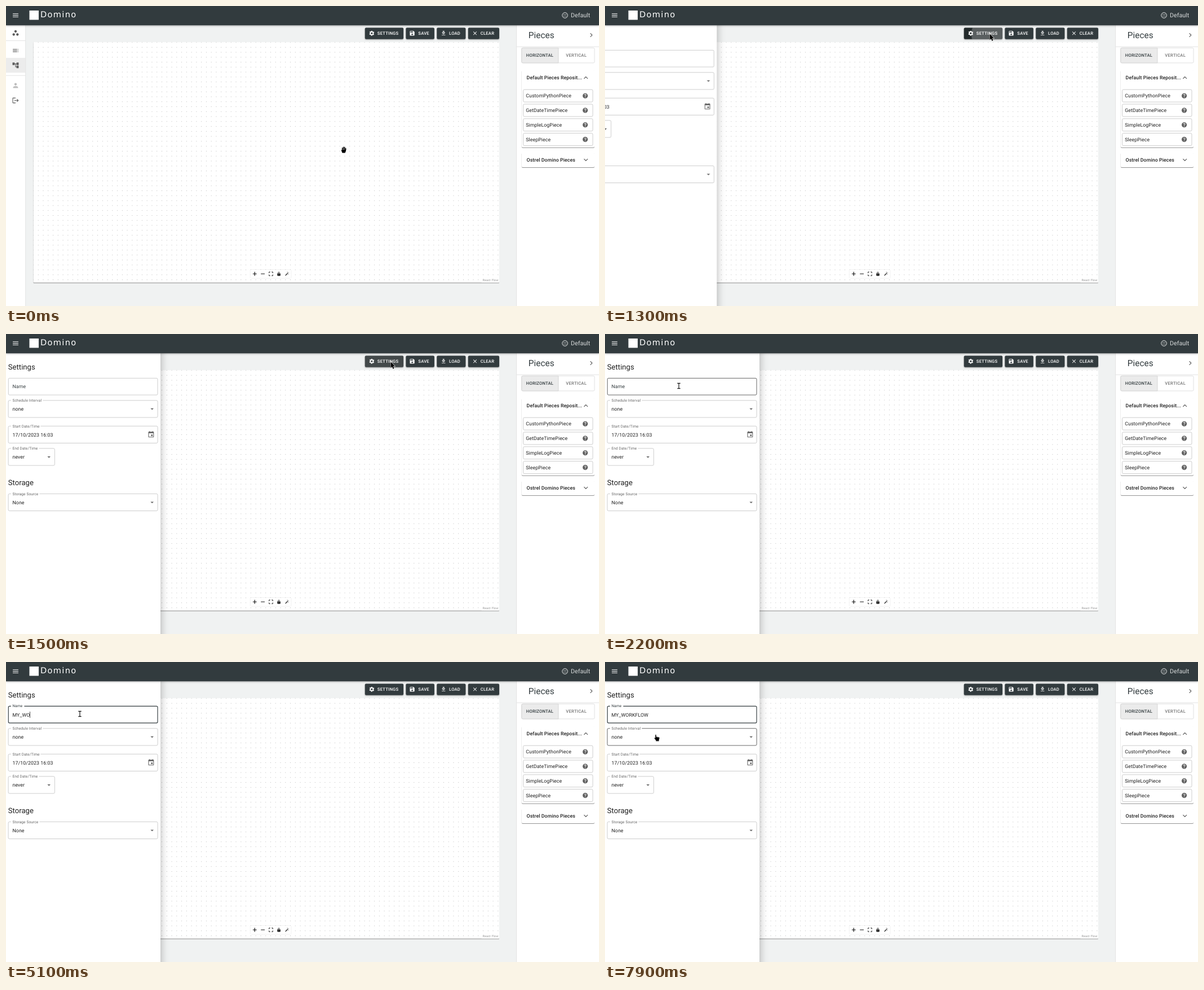
These frames come from a looping animation (1052x532 px, 8 s). An HTML page:

```html
<!DOCTYPE html>
<html lang="en">
<head>
<meta charset="utf-8">
<title>Workflow editor</title>
<style>
html, body { margin: 0; width: 100%; height: 100%; overflow: hidden; background: #f0f2f2; }
svg { display: block; }
#stage { width: 1052px; height: 532px; font: 8.77px Roboto, sans-serif; letter-spacing: .00938em; text-rendering: geometricPrecision; }
text { fill: #212121; white-space: pre; }
.dark { fill: #323b3e; }
.white, .btn text { fill: #fff; }
.h { font-size: 13.15px; letter-spacing: 0; }
.caps { font-size: 7.67px; font-weight: 500; letter-spacing: .02857em; }
.bold { font-weight: 500; }
.mid { text-anchor: middle; }
.line { stroke: #dcdcdc; stroke-width: .8; }
.chev { fill: none; stroke: #555; stroke-width: 1.1; }
.card { fill: #fff; filter: drop-shadow(0 1px .45px rgba(0,0,0,.42)); }
.item { fill: #fff; stroke: #bdbdbd; stroke-width: .75; }
.box { fill: #fff; stroke: #bcbcbc; stroke-width: .75; }
.notch { fill: #fff; }
.label { font-size: 6.58px; fill: #666; }
.btn rect { fill: #323b3e; filter: drop-shadow(0 1px 1px rgba(0,0,0,.35)); }

/* every animation is scrubbed by --t */
.anim, #cursor g { animation: 8s linear calc(var(--t) * -1ms) infinite paused; }
#cursor { animation-name: move; }
#cursor g { animation-timing-function: step-end; }
#cursor #grab { animation-name: grab; }
#cursor #point { animation-name: point; }
#cursor #arrow { animation-name: arrow; }
#cursor #beam { animation-name: beam; }
#drawer { animation-name: slide; filter: drop-shadow(0 6px 7.5px rgba(0,0,0,.3)); }
#ripple { animation-name: ripple; }
#rippleFade { animation-name: fade; }
.btn #hot { animation-name: hover; }
#nameBox { animation-name: focus; animation-timing-function: step-end; }
#nameNotch { animation-name: open; animation-timing-function: step-end; }
#schedBox { animation-name: over; animation-timing-function: step-end; }
#nameLabel { animation-name: shrink; }

@keyframes move {
  0%, 1.25% { transform: translate(599px,255px); animation-timing-function: ease-in-out; }
  10%, 20% { transform: translate(684px,56px); animation-timing-function: ease-in; }
  23.75% { transform: translate(353px,92px); }
  25% { transform: translate(235px,93px); animation-timing-function: ease-out; }
  27.5% { transform: translate(131px,92px); animation-timing-function: step-end; }
  96.25% { transform: translate(97px,133px); animation-timing-function: step-end; }
  98.75%, 100% { transform: translate(92px,134.5px); }
}
@keyframes grab { 0% { opacity: 1; } 10% { opacity: 0; } 22.5% { opacity: 1; } 25%, 100% { opacity: 0; } }
@keyframes point { 0% { opacity: 0; } 10% { opacity: 1; } 15% { opacity: 0; } 96.25%, 100% { opacity: 1; } }
@keyframes arrow { 0% { opacity: 0; } 15% { opacity: 1; } 22.5%, 100% { opacity: 0; } }
@keyframes beam { 0% { opacity: 0; } 25% { opacity: 1; } 96.25%, 100% { opacity: 0; } }
@keyframes slide {
  0%, 15.2% { transform: translateX(-310px); }
  15.225% { transform: translateX(-274px); animation-timing-function: cubic-bezier(0,0,.2,1); }
  18.04%, 100% { transform: none; }
}
@keyframes ripple {
  0%, 13.2% { transform: scale(0); animation-timing-function: cubic-bezier(.4,0,.2,1); }
  20.075%, 100% { transform: scale(1); }
}
@keyframes fade {
  0%, 13.2% { opacity: .1; }
  14.5%, 15.6% { opacity: .28; }
  22.5%, 100% { opacity: 0; }
}
@keyframes hover { 0%, 9.5% { fill: #323b3e; } 12.5%, 21.25% { fill: #232a2b; } 24%, 100% { fill: #323b3e; } }
@keyframes focus {
  0% { stroke: #bcbcbc; stroke-width: .75px; }
  25% { stroke: #333; stroke-width: .75px; }
  28.75%, 100% { stroke: #323b3e; stroke-width: 1.15px; }
}
@keyframes open { 0% { opacity: 0; } 28.75%, 100% { opacity: 1; } }
@keyframes over { 0% { stroke: #bcbcbc; } 96.25%, 100% { stroke: #333; } }
@keyframes shrink {
  0%, 28% { transform: translate(11.5px,96.3px); animation-timing-function: cubic-bezier(0,0,.2,1); }
  30.5%, 100% { transform: translate(11.5px,80.3px) scale(.75); fill: #323b3e; }
}
</style>
</head>
<body>
<svg id="stage" viewBox="0 0 1052 532">
  <defs>
    <pattern id="dots" x="44.1" y="60.1" width="8.77" height="8.77" patternUnits="userSpaceOnUse">
      <circle cx="4.385" cy="4.385" r=".55" fill="#aaa"/>
    </pattern>
    <clipPath id="hotClip"><rect x="636.8" y="38.5" width="68.3" height="20.2" rx="2"/></clipPath>
    <g id="help" transform="scale(.457) translate(-12 -12)"><path fill="#616161" d="M12 2C6.48 2 2 6.48 2 12s4.48 10 10 10 10-4.48 10-10S17.52 2 12 2zm1 17h-2v-2h2v2zm2.07-7.75l-.9.92C13.45 12.9 13 13.5 13 15h-2v-.5c0-1.1.45-2.1 1.17-2.83l1.24-1.26c.37-.36.59-.86.59-1.41 0-1.1-.9-2-2-2s-2 .9-2 2H8c0-2.21 1.79-4 4-4s4 1.79 4 4c0 .88-.36 1.68-.93 2.25z"/></g>
    <path id="drop" d="M-2.8-1.2h5.6L0 1.6z" fill="#666"/>
  </defs>

  <rect width="1052" height="532" fill="#f0f2f2"/>

  <!-- flow canvas -->
  <rect class="card" x="48.5" y="64.3" width="826.5" height="426.2" rx="1"/>
  <rect x="48.5" y="64.3" width="826.5" height="426.2" fill="url(#dots)"/>
  <rect x="843.5" y="481.5" width="31.5" height="9" fill="#fff" opacity=".6"/>
  <text x="845.5" y="487.6" style="font-size:5.5px;fill:#999;letter-spacing:.02em">React Flow</text>
  <rect x="434" y="468" width="71.5" height="14.3" fill="#fff" style="filter:drop-shadow(0 0 1px rgba(0,0,0,.12))"/>
  <g fill="none" stroke="#111" stroke-width="1.2">
    <path d="M437.9 475h6.8M441.3 471.6v6.8M452.2 475h6.8"/>
    <path d="M466.7 473.8v-2.1h2.1M471.2 471.7h2.1v2.1M473.3 476.2v2.1h-2.1M468.8 478.3h-2.1v-2.1" stroke-width=".9"/>
    <path d="M482.6 474.5v-1a1.5 1.5 0 0 1 3 0" stroke-width=".9"/>
    <path d="M495.7 477.9l4-4" stroke-width="1.3"/>
    <path d="M499.2 471.6v1.3M501.6 475.2h-1.3M500.2 473.4l1.2-1.2" stroke-width=".7"/>
  </g>
  <rect x="481.4" y="474.2" width="5.4" height="4.2" rx=".6" fill="#111"/>
  <circle cx="484.1" cy="476.3" r=".6" fill="#fff"/>

  <!-- toolbar -->
  <g class="btn caps">
    <rect id="hot" class="anim" x="636.8" y="38.5" width="68.3" height="20.2" rx="2"/>
    <rect x="709.4" y="38.5" width="50.5" height="20.2" rx="2"/>
    <rect x="764.3" y="38.5" width="51.1" height="20.2" rx="2"/>
    <rect x="819.8" y="38.5" width="55.2" height="20.2" rx="2"/>
    <g clip-path="url(#hotClip)"><g transform="translate(684 50)"><g id="rippleFade" class="anim"><circle id="ripple" class="anim" r="49" fill="#fff"/></g></g></g>
    <g transform="translate(648.9 48.4) scale(.457)" fill="none" stroke="#fff">
      <circle r="5.4" stroke-width="3.6"/>
      <circle r="8.1" stroke-width="3.2" stroke-dasharray="4.4 4.082" transform="rotate(-105.5)"/>
    </g>
    <g class="white">
      <path transform="translate(720.6 48.4) scale(.457) translate(-12 -12)" d="M17 3H5c-1.11 0-2 .9-2 2v14c0 1.1.89 2 2 2h14c1.1 0 2-.9 2-2V7l-4-4zm-5 16c-1.66 0-3-1.34-3-3s1.34-3 3-3 3 1.34 3 3-1.34 3-3 3zm3-10H5V5h10v4z"/>
      <path transform="translate(776.2 48.4) scale(.457) translate(-12 -12)" d="M19 9h-4V3H9v6H5l7 7 7-7zm-8 2V5h2v6h1.2L12 13.2 9.8 11zM5 18v2h14v-2z"/>
      <path transform="translate(832 48.4) scale(.457) translate(-12 -12)" d="M19 6.41L17.59 5 12 10.59 6.41 5 5 6.41 10.59 12 5 17.59 6.41 19 12 13.41 17.59 19 19 17.59 13.41 12z"/>
    </g>
    <text x="658.8" y="51.2">SETTINGS</text>
    <text x="731.3" y="51.2">SAVE</text>
    <text x="786" y="51.2">LOAD</text>
    <text x="841.7" y="51.2">CLEAR</text>
  </g>

  <!-- pieces panel -->
  <rect x="905.5" y="34" width="147" height="498" fill="#fff"/>
  <path class="line" d="M905.6 34v498M906 72.2h146"/>
  <text class="dark" x="926.8" y="57.4" style="font-size:15.4px;letter-spacing:0">Pieces</text>
  <path class="chev" d="M1036.6 48.4l3.2 3.2-3.2 3.2"/>
  <rect x="914.8" y="74.3" width="129.2" height="26.6" rx="2" fill="#fff" stroke="#d8d8d8" stroke-width=".8"/>
  <path d="M916.8 74.3H980v26.6h-63.2a2 2 0 0 1-2-2V76.3a2 2 0 0 1 2-2z" fill="#ebebeb" stroke="#d0d0d0" stroke-width=".8"/>
  <text class="caps dark mid" x="947" y="89.9">HORIZONTAL</text>
  <text class="caps mid" x="1011.7" y="89.9" style="fill:#757575">VERTICAL</text>
  <rect class="card" x="914.8" y="113" width="129.2" height="137.8" rx="2"/>
  <text class="bold" x="923.6" y="130.3">Default Pieces Reposit...</text>
  <path class="chev" d="M1025.4 128.9l3.3-3.3 3.3 3.3"/>
  <g class="item">
    <rect x="917.6" y="148.2" width="123.4" height="22" rx="2.2"/>
    <rect x="917.6" y="174" width="123.4" height="22" rx="2.2"/>
    <rect x="917.6" y="199.8" width="123.4" height="22" rx="2.2"/>
    <rect x="917.6" y="225.6" width="123.4" height="22" rx="2.2"/>
  </g>
  <text x="922.2" y="162.2">CustomPythonPiece</text>
  <text x="922.2" y="188">GetDateTimePiece</text>
  <text x="922.2" y="213.8">SimpleLogPiece</text>
  <text x="922.2" y="239.6">SleepPiece</text>
  <use href="#help" x="1027.6" y="159.2"/>
  <use href="#help" x="1027.6" y="185"/>
  <use href="#help" x="1027.6" y="210.8"/>
  <use href="#help" x="1027.6" y="236.6"/>
  <rect class="card" x="914.8" y="259.4" width="129.2" height="26.6" rx="2"/>
  <text class="bold" x="923.6" y="275.9">Ostrel Domino Pieces</text>
  <path class="chev" d="M1025.4 271.2l3.3 3.3 3.3-3.3"/>

  <!-- side rail -->
  <rect x="0" y="34" width="34.7" height="498" fill="#fff"/>
  <rect x="0" y="92" width="34.5" height="26.3" fill="#ececec"/>
  <path class="line" d="M34.7 34v498M0 61.5h34.5M0 123.3h34.5"/>
  <g fill="#5c5c5c">
    <path transform="translate(17 47.8) scale(.548) translate(-12 -12)" d="M6 13c-2.2 0-4 1.8-4 4s1.8 4 4 4 4-1.8 4-4-1.8-4-4-4zm6-10C9.8 3 8 4.8 8 7s1.8 4 4 4 4-1.8 4-4-1.8-4-4-4zm6 10c-2.2 0-4 1.8-4 4s1.8 4 4 4 4-1.8 4-4-1.8-4-4-4z"/>
    <path transform="translate(17 79) scale(.548) translate(-12 -12)" d="M3 9h14V7H3v2zm0 4h14v-2H3v2zm0 4h14v-2H3v2zm16 0h2v-2h-2v2zm0-10v2h2V7h-2zm0 6h2v-2h-2v2z"/>
    <path transform="translate(17 105.3) scale(.548) translate(-12 -12)" d="M22 11V3h-7v3H9V3H2v8h7V8h2v10h4v3h7v-8h-7v3h-2V8h2v3z"/>
    <path fill="#bdbdbd" transform="translate(17 141) scale(.548) translate(-12 -12)" d="M12 12c2.21 0 4-1.79 4-4s-1.79-4-4-4-4 1.79-4 4 1.79 4 4 4zm0 2c-2.67 0-8 1.34-8 4v2h16v-2c0-2.66-5.33-4-8-4z"/>
    <path transform="translate(17 167.5) scale(.548) translate(-12 -12)" d="M17 7l-1.41 1.41L18.17 11H8v2h10.17l-2.58 2.58L17 17l5-5zM4 5h8V3H4c-1.1 0-2 .9-2 2v14c0 1.1.9 2 2 2h8v-2H4V5z"/>
  </g>

  <!-- settings drawer -->
  <g id="drawer" class="anim">
    <rect x="-10" y="20" width="284" height="550" fill="#fff"/>
    <text class="h" x="3.8" y="62.8">Settings</text>
    <text class="h" x="3.8" y="268.3">Storage</text>
    <g class="box">
      <rect id="nameBox" class="anim" x="4.3" y="78.4" width="264.7" height="29.7" rx="2"/>
      <rect id="schedBox" class="anim" x="4.1" y="117.8" width="265" height="30.2" rx="2.2"/>
      <rect x="4.1" y="163.3" width="265" height="30.2" rx="2.2"/>
      <rect x="4.1" y="202.9" width="82.3" height="30.2" rx="2.2"/>
      <rect x="4.1" y="283.4" width="265" height="30.2" rx="2.2"/>
    </g>
    <g class="notch">
      <rect id="nameNotch" class="anim" x="8.9" y="77" width="23.5" height="3"/>
      <rect x="8.9" y="117" width="56.5" height="2"/>
      <rect x="8.9" y="162.5" width="52.5" height="2"/>
      <rect x="8.9" y="202" width="49.5" height="2"/>
      <rect x="8.9" y="282.6" width="50.5" height="2"/>
    </g>
    <text id="nameLabel" class="label anim" style="font-size:8.77px">Name</text>
    <text class="label" x="11.5" y="120">Schedule Interval</text>
    <text class="label" x="11.5" y="165.5">Start Date/Time</text>
    <text class="label" x="11.5" y="205.1">End Date/Time</text>
    <text class="label" x="11.5" y="285.6">Storage Source</text>
    <text id="typed" x="11.5" y="96.5"></text>
    <path id="caret" d="M0 88v11" stroke="#222" stroke-width=".8"/>
    <text x="11.5" y="136.1">none</text>
    <text x="11.5" y="181.7">17/10/2023 16:03</text>
    <text x="11.5" y="221.2">never</text>
    <text x="11.5" y="301.8">None</text>
    <use href="#drop" x="259.2" y="133"/>
    <use href="#drop" x="76.2" y="218.1"/>
    <use href="#drop" x="259.2" y="298.6"/>
    <path fill="#666" transform="translate(257.4 178.3) scale(.548) translate(-12 -12)" d="M17 12h-5v5h5v-5zM16 1v2H8V1H6v2H5c-1.11 0-1.99.9-1.99 2L3 19c0 1.1.89 2 2 2h14c1.1 0 2-.9 2-2V5c0-1.1-.9-2-2-2h-1V1h-2zm3 18H5V8h14v11z"/>
  </g>

  <!-- header -->
  <rect class="dark" width="1052" height="34.2" style="filter:drop-shadow(0 1.2px 1.4px rgba(0,0,0,.3))"/>
  <path class="white" transform="translate(17 16.5) scale(.548) translate(-12 -12)" d="M3 18h18v-2H3v2zm0-5h18v-2H3v2zm0-7v2h18V6H3z"/>
  <rect class="white" x="41.5" y="8" width="16.5" height="16.5"/>
  <text class="white" x="61" y="20.3" style="font:14.6px 'DejaVu Sans',sans-serif;letter-spacing:1.3px">Domino</text>
  <circle cx="991.6" cy="16.5" r="4.8" fill="none" stroke="#f2f3f3" stroke-width="1"/>
  <g fill="#e4e6e6"><circle cx="990.1" cy="15.1" r=".8"/><circle cx="993.1" cy="15.1" r=".8"/><circle cx="990.1" cy="18" r=".8"/><circle cx="993.1" cy="18" r=".8"/></g>
  <text x="1002" y="20.2" style="font-size:10.7px;letter-spacing:0;fill:#d8dbdb">Default</text>

  <!-- pointer shapes, centred on the origin -->
  <g id="cursor" class="anim" stroke-linecap="round" stroke-linejoin="round">
    <g id="grab">
      <path d="M-4.4.2L-3-.5-2.6-3.6-1.2-4.8 0-5.4 1.6-4.8 3.2-4 4.2-2.6 4 1.8 2.6 5.4h-5z" stroke="#fff" stroke-width="1.2" fill="#fff"/>
      <path d="M-2.3 0v-3.2M-.3-1v-3.8M1.7-1v-3.4M3.6 0v-2.4" fill="none" stroke="#000" stroke-width="1.5"/>
      <path d="M-4.4.4l1.4-.2L4.3-1 4 2 2.6 5.4h-5z"/>
    </g>
    <g id="point">
      <path d="M-2.7-5.4c.9-.5 1.6 0 1.6.8v2.8l4.6.8c1 .3 1.3 1 1.1 1.8L3.7 3.2V5.7h-5.4V4.2L-4.4 1c-.4-.8.4-1.4 1.1-.9l.6.5z" stroke="#fff" stroke-width="1.4" paint-order="stroke"/>
    </g>
    <g id="arrow">
      <path d="M-1.5-6.8V4.2L1 1.9 2.7 5.9 4.5 5.1 2.8 1.3H6z" stroke="#fff" stroke-width="1" paint-order="stroke"/>
    </g>
    <g id="beam" fill="none">
      <path d="M-2.2-4.6H-.6L0-4l.6-.6h1.6M0-4v8M-2.2 4.6H-.6L0 4l.6.6h1.6" stroke="#fff" stroke-width="2.2"/>
      <path d="M-2.2-4.6H-.6L0-4l.6-.6h1.6M0-4v8M-2.2 4.6H-.6L0 4l.6.6h1.6" stroke="#000" stroke-width="1.1"/>
    </g>
  </g>
</svg>
<script>
const LOOP = 8000, STEP = 100, LEFT = 11.5;
const WORD = 'MY_WORKFLOWW';
// [time, letters shown]
const keys = [[0, 0], [3300, 2], [4500, 3], [5100, 5], [5300, 6], [5400, 7], [5600, 8],
  [5700, 9], [5900, 10], [6000, 11], [6100, 12], [7000, 11]];
const caretOn = [[2400, 4000], [4500, 6700], [7300, 7900]];
const typed = document.getElementById('typed');
const caret = document.getElementById('caret');

function draw(ms) {
  const t = Math.floor(ms % LOOP / STEP) * STEP;
  document.documentElement.style.setProperty('--t', t + 1);
  const count = keys.filter(k => k[0] <= t).pop()[1];
  typed.textContent = WORD.slice(0, count);
  const width = count ? typed.getComputedTextLength() : 0;
  caret.setAttribute('transform', `translate(${LEFT + width} 0)`);
  caret.style.opacity = caretOn.some(([a, b]) => t >= a && t < b) ? 1 : 0;
}

const start = performance.now();
function tick() {
  draw(performance.now() - start);
  requestAnimationFrame(tick);
}
tick();
</script>
</body>
</html>
```
